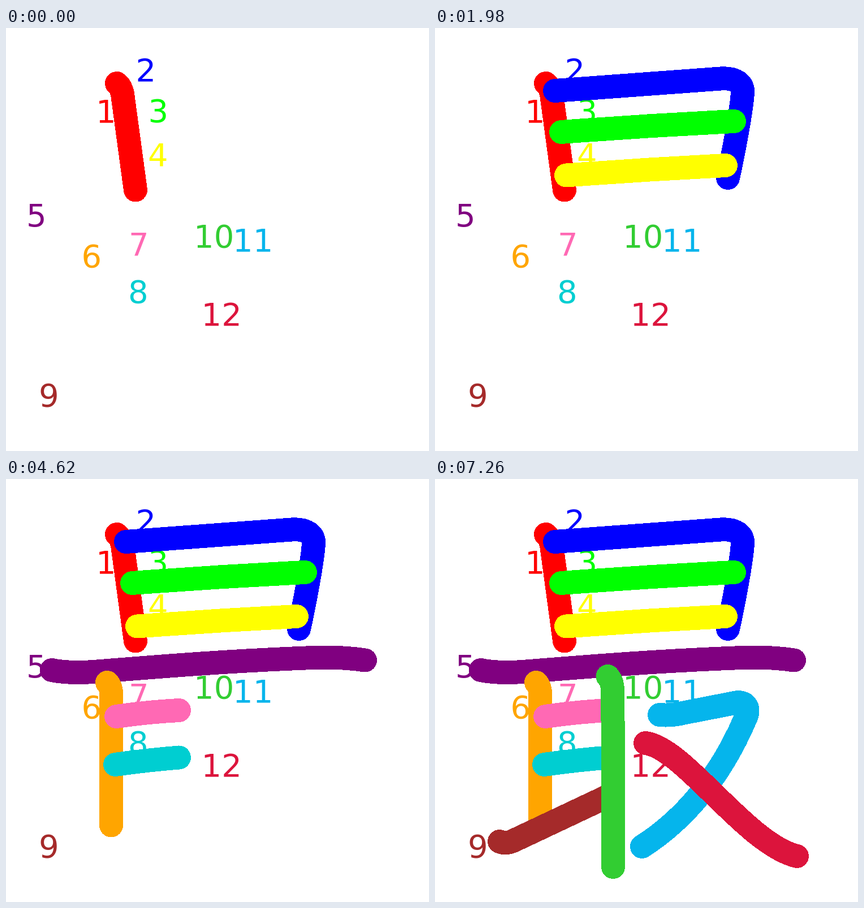
Recreate the animation shown at these times as an HTML page. Size 748 by 748 pixels, loop 7920 ms.

```html
<!DOCTYPE html>
<html lang="en">
<head>
<meta charset="utf-8">
<title>Stroke order</title>
<style>
  html, body { margin: 0; width: 100%; height: 100%; overflow: hidden; background: #fff; }
  svg { display: block; width: 100%; height: 100%; }
  path { fill: none; stroke-width: 42; stroke-linecap: round; stroke-linejoin: round; shape-rendering: crispEdges; }
  text { font: 56px "DejaVu Sans", Verdana, sans-serif; }
</style>
</head>
<body>
<svg viewBox="0 0 748 748"></svg>
<script>
const STEP = 660;

// colour, label x, label baseline, stroke path
const strokes = [
  ["#f00", 159, 166.5, "M196 98Q203 103 206 117L229 286.5"],
  ["#00f", 229.5, 94, "M212 111L505 89.5C533 87.5 545 100 544 113C543 140 528 220 518 265"],
  ["#0f0", 251.5, 166, "M223 184Q376 172.5 529 165"],
  ["#ff0", 251, 244, "M232 260.5Q373 250 514 243"],
  ["purple", 36, 351, "M81 338Q110 344 155 341C280 331 390 322 530 316.5Q590 313.5 635 320.5"],
  ["orange", 133.5, 423, "M179 360Q186 367 186.5 382L186 515L186 612.5"],
  ["hotpink", 217, 402, "M195 420Q250 412 306 409"],
  ["darkturquoise", 216, 485.5, "M193 505Q250 497 306 492.5"],
  ["brown", 58, 669, "M114 641Q124 646 138 640L314 557"],
  ["limegreen", 332, 388, "M305.5 349Q314 358 314 374L315 480V686"],
  ["#05b5ec", 401, 395, "M397 417Q418 419 440 413.5L530 396C549 392 557 404 550 421C505 527 440 603 366 650"],
  ["crimson", 345.5, 525.5, "M372 467C440 475 550 645 640 667"]
];

const svg = document.querySelector("svg");

function add(tag, attrs) {
  const el = document.createElementNS("http://www.w3.org/2000/svg", tag);
  for (const name in attrs) el.setAttribute(name, attrs[name]);
  return svg.appendChild(el);
}

strokes.forEach(([fill, x, y], i) => {
  add("text", { x, y, fill }).textContent = i + 1;
});
const paths = strokes.map(([stroke, , , d]) => add("path", { d, stroke }));

function draw(now) {
  const current = Math.floor(now / STEP) % paths.length;
  paths.forEach((path, i) => {
    path.style.display = i <= current ? "" : "none";
  });
}

const start = performance.now();
function loop() {
  draw(performance.now() - start);
  requestAnimationFrame(loop);
}
loop();
</script>
</body>
</html>
```
